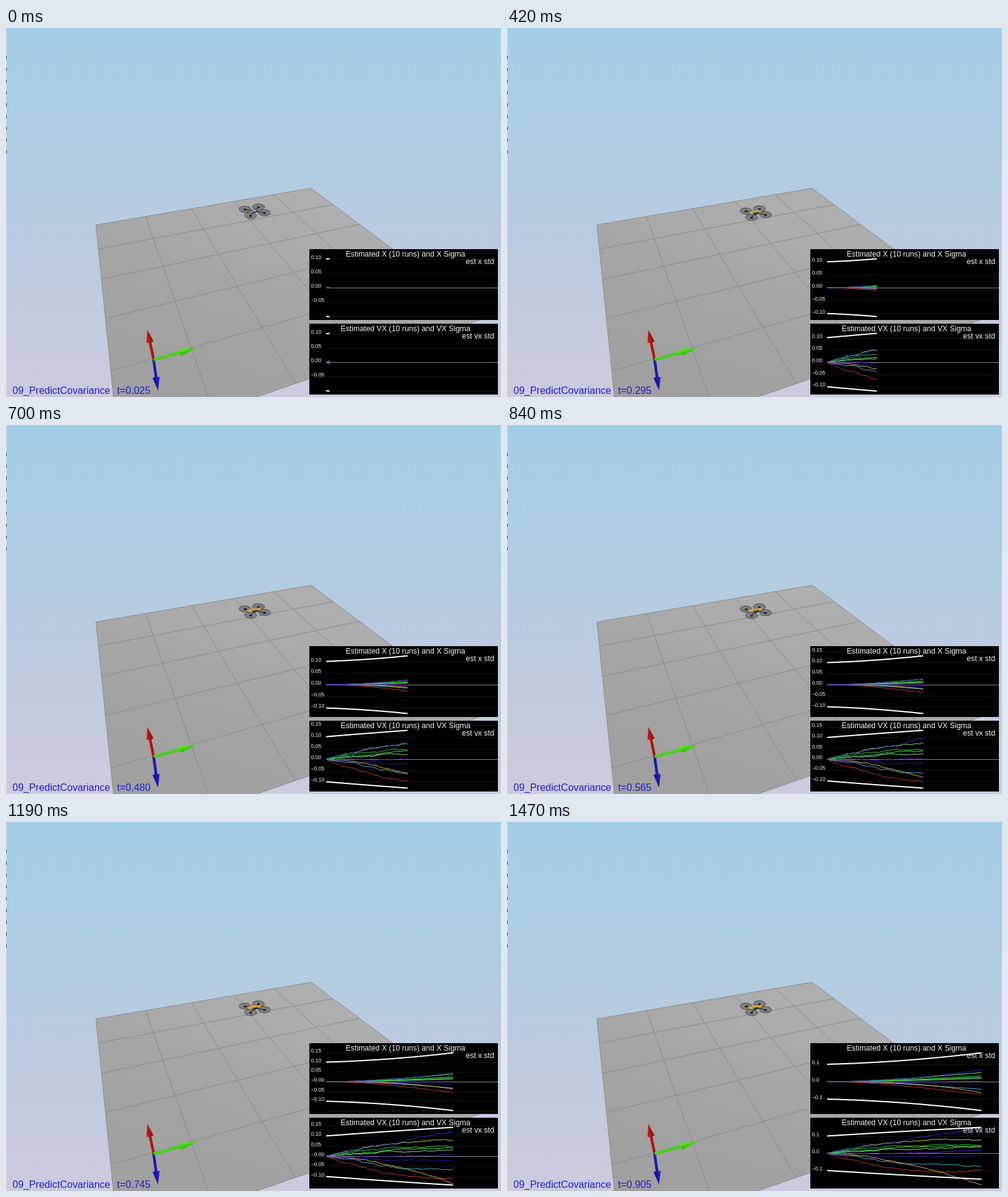
Write an HTML page with a canvas that moves like this. It is 798x594 px and loops after 1540 ms.

```html
<!DOCTYPE html>
<html lang="en">
<head>
<meta charset="utf-8">
<title>Predict covariance</title>
<style>
html, body { margin: 0; width: 100%; height: 100%; overflow: hidden; }
canvas { display: block; }
</style>
</head>
<body>
<canvas id="stage" width="798" height="594"></canvas>
<script>
const ctx = document.getElementById('stage').getContext('2d');
const STEP_MS = 70, STEPS = 22;
const DT = 0.005, END = 0.905;
const FONT = '"Liberation Sans", Arial, sans-serif';

const CLOCK = [[0, 0.025], [4, 0.2], [8, 0.39], [12, 0.565], [15, 0.665], [21, END]];

// Colour of each run with its velocity halfway and at the end.
const RUNS = [
  ['#2c1cae', -0.018, -0.016],
  ['#48b8ee', -0.054, -0.078],
  ['#cc3c1c', -0.095, -0.097],
  ['#ecc040', -0.06, -0.189],
  ['#7cf4a8', 0.022, 0.034],
  ['#58f058', 0.032, 0.041],
  ['#28d82c', 0.042, 0.046],
  ['#a8ec58', 0.066, 0.077],
  ['#2434dc', 0.072, 0.149],
  ['#6416c8', 0, 0.02]
];

const sigmaX = t => 0.1 + 0.0246 * t + 0.0534 * t * t;
const sigmaV = t => 0.1 + 0.0633 * t - 0.008 * t * t;

function interpolate(points, x) {
  let i = 1;
  while (i < points.length - 1 && points[i][0] < x) i++;
  const [x0, y0] = points[i - 1], [x1, y1] = points[i];
  return y0 + (y1 - y0) * (x - x0) / (x1 - x0);
}

function seeded(seed) {
  return () => {
    seed = (seed * 1664525 + 1013904223) % 4294967296;
    return seed / 4294967296 - 0.5;
  };
}

// A parabola from zero plus a fading random walk; position is its integral.
function simulate([color, middle, end], n) {
  const random = seeded(n * 97 + 11);
  const v = [], x = [];
  let drift = 0, place = 0;
  for (let t = DT; t < END + DT / 2; t += DT) {
    const s = t / END;
    drift = drift * 0.92 + random() * 0.0038;
    const speed = (4 * middle - end) * s + (2 * end - 4 * middle) * s * s + drift * Math.min(1, t * 8);
    place += speed * DT;
    v.push(speed);
    x.push(place);
  }
  return { color, v, x };
}

const runs = RUNS.map(simulate);

function line(color, width, ...points) {
  ctx.strokeStyle = color;
  ctx.lineWidth = width;
  ctx.beginPath();
  points.forEach(([x, y]) => ctx.lineTo(x, y));
  ctx.stroke();
}

function polygon(fill, ...points) {
  ctx.fillStyle = fill;
  ctx.beginPath();
  points.forEach(([x, y]) => ctx.lineTo(x, y));
  ctx.closePath();
  ctx.fill();
}

function label(text, x, y, size, color, align = 'left') {
  ctx.font = `${size}px ${FONT}`;
  ctx.textAlign = align;
  ctx.fillStyle = color;
  ctx.fillText(text, x, y);
}

function gradient(x0, y0, x1, y1, ...stops) {
  const g = ctx.createLinearGradient(x0, y0, x1, y1);
  stops.forEach(([at, color]) => g.addColorStop(at, color));
  return g;
}

// Perspective map from the unit square to the quad a, b, c, d.
function perspective(a, b, c, d) {
  const [px, py] = [b[0] - c[0], b[1] - c[1]];
  const [qx, qy] = [d[0] - c[0], d[1] - c[1]];
  const [sx, sy] = [0, 1].map(i => a[i] - b[i] + c[i] - d[i]);
  const det = px * qy - qx * py;
  const g = (sx * qy - qx * sy) / det;
  const h = (px * sy - sx * py) / det;
  return (u, v) => [0, 1].map(i =>
    (a[i] + (b[i] - a[i] + g * b[i]) * u + (d[i] - a[i] + h * d[i]) * v) / (1 + g * u + h * v));
}

const CORNERS = [[145, 317], [492, 258], [772, 467], [181, 671]];
const floorPoint = perspective(...CORNERS);

function drawSky() {
  ctx.fillStyle = gradient(0, 0, 0, 594, [0, '#a2cee7'], [0.32, '#aecde1'], [0.6, '#bccbdf'], [1, '#cccbdd']);
  ctx.fillRect(0, 0, 798, 594);
  ctx.fillStyle = '#d4d8de';
  ctx.fillRect(0, 0, 1, 594);
  ctx.fillStyle = '#444';
  for (let y = 45; y < 210; y += 19) ctx.fillRect(0, y, 1, 5);
}

function drawFloor() {
  polygon(gradient(400, 260, 300, 594, [0, '#afafaf'], [0.42, '#a6a6a6'], [1, '#a0a0a0']), ...CORNERS);
  for (let k = 0; k < 1.1; k += 0.2) {
    line('#8a8a8a', 1, floorPoint(k, 0), floorPoint(k, 1));
    line('#8a8a8a', 1, floorPoint(0, k), floorPoint(1, k));
  }
}

function drawArrow(x, y, headLength, light, dark) {
  const ox = 238, oy = 534;
  ctx.save();
  ctx.translate(ox, oy);
  ctx.rotate(Math.atan2(y - oy, x - ox));
  const length = Math.hypot(x - ox, y - oy), neck = length - headLength;
  const shade = gradient(0, -5, 0, 5, [0, light], [1, dark]);
  ctx.fillStyle = shade;
  ctx.fillRect(0, -2.2, neck + 1, 4.4);
  polygon(shade, [neck, -5.8], [length, 0], [neck, 5.8], [neck - 1.5, 0]);
  ctx.restore();
}

function drawRotor(x, y) {
  ctx.fillStyle = '#808080';
  ctx.strokeStyle = '#4c4c4c';
  ctx.lineWidth = 1;
  ctx.beginPath();
  ctx.ellipse(x, y, 9.7, 5, 0.04, 0, Math.PI * 2);
  ctx.fill();
  ctx.stroke();
  ctx.fillStyle = '#20202c';
  ctx.fillRect(x - 2, y - 1, 4, 3);
}

function drawDrone(t) {
  const drop = 5 * Math.sin(Math.min(1, t / 0.65) * Math.PI / 2);
  ctx.save();
  ctx.translate(0, drop);
  [[407, 287.8], [385.5, 291.5], [416.8, 297.2], [394.3, 301.6]].forEach(p => drawRotor(...p));
  line('#383838', 1.3, [387, 292], [415, 297]);
  line('#383838', 1.3, [406, 289], [395, 301]);
  polygon('#252a38', [396, 294], [403, 291.5], [407, 295], [400, 298]);
  if (t < 0.1) {
    line('#e8ecf4', 1.5, [398, 294.5], [404, 293.5]);
    line('#2c50b0', 1.3, [398, 296.5], [405, 295.5]);
  } else {
    const reach = Math.min(10.5, 3 + t * 20);
    line(t < 0.3 ? '#b8b848' : '#e0aa30', 3.4, [400 - reach, 294.4], [400 + reach, 291]);
    line('#6c5420', 1, [396, 294.5], [407, 293]);
  }
  ctx.restore();
}

function drawPlot(top, title, legend, key, sigma, t) {
  const count = Math.round(t / DT);
  const xAt = time => 514.7 + 276.6 * time;
  const high = sigma(t);
  const low = runs.reduce((m, r) => Math.min(m, ...r[key].slice(0, count)), -high);
  const scale = 93 / (high - low);
  const yAt = value => top + 15.5 + (high - value) * scale;

  ctx.save();
  ctx.beginPath();
  ctx.rect(489, top, 304, 114);
  ctx.clip();
  ctx.fillStyle = '#000';
  ctx.fillRect(489, top, 304, 114);

  const coarse = high - low > 0.32;
  const tick = coarse ? 0.1 : 0.05;
  const first = Math.ceil((low - 5.5 / scale) / tick);
  for (let k = first; yAt(k * tick) > top + 7; k++) {
    const y = Math.round(yAt(k * tick)) + 0.5;
    line(k ? '#171717' : '#868686', 1, [516, y], [793, y]);
    if (y > top + 107.6) continue;
    const negative = k < 0 || (k === 0 && first === -3);
    label((negative ? '\u2212' : '') + Math.abs(k * tick).toFixed(coarse ? 1 : 2), 491.5, y - 0.2, 8.6, '#f4f4f4');
  }

  for (const run of runs) {
    line(run.color, 1, ...run[key].slice(0, count).map((v, i) => [xAt((i + 1) * DT), yAt(v)]));
  }
  for (const sign of [1, -1]) {
    const edge = [];
    for (let i = 1; i <= count; i++) edge.push([xAt(i * DT), yAt(sign * sigma(i * DT))]);
    line('#fff', 2, ...edge);
  }
  label(title, 644, top + 12, 12.3, '#f4f4f4', 'center');
  label(legend, 787, top + 24, 12.3, '#f4f4f4', 'right');
  ctx.restore();
}

function draw(step) {
  const t = Math.round(interpolate(CLOCK, step) / DT) * DT;
  drawSky();
  drawFloor();
  drawDrone(t);
  drawArrow(228, 486, 20, '#d42010', '#8c0c08');
  drawArrow(245, 583.5, 21, '#2424d0', '#101090');
  drawArrow(307, 515, 27, '#58f41c', '#30b808');
  label('09_PredictCovariance', 10.5, 588.5, 16, '#2020c8');
  label('t=' + t.toFixed(3), 179, 588.5, 16, '#2020c8');
  drawPlot(356, 'Estimated X (10 runs) and X Sigma', 'est x std', 'x', sigmaX, t);
  drawPlot(476, 'Estimated VX (10 runs) and VX Sigma', 'est vx std', 'v', sigmaV, t);
}

let start;
function tick(now) {
  start ??= now;
  draw(Math.floor((now - start) / STEP_MS) % STEPS);
  requestAnimationFrame(tick);
}
draw(0);
requestAnimationFrame(tick);
</script>
</body>
</html>
```
